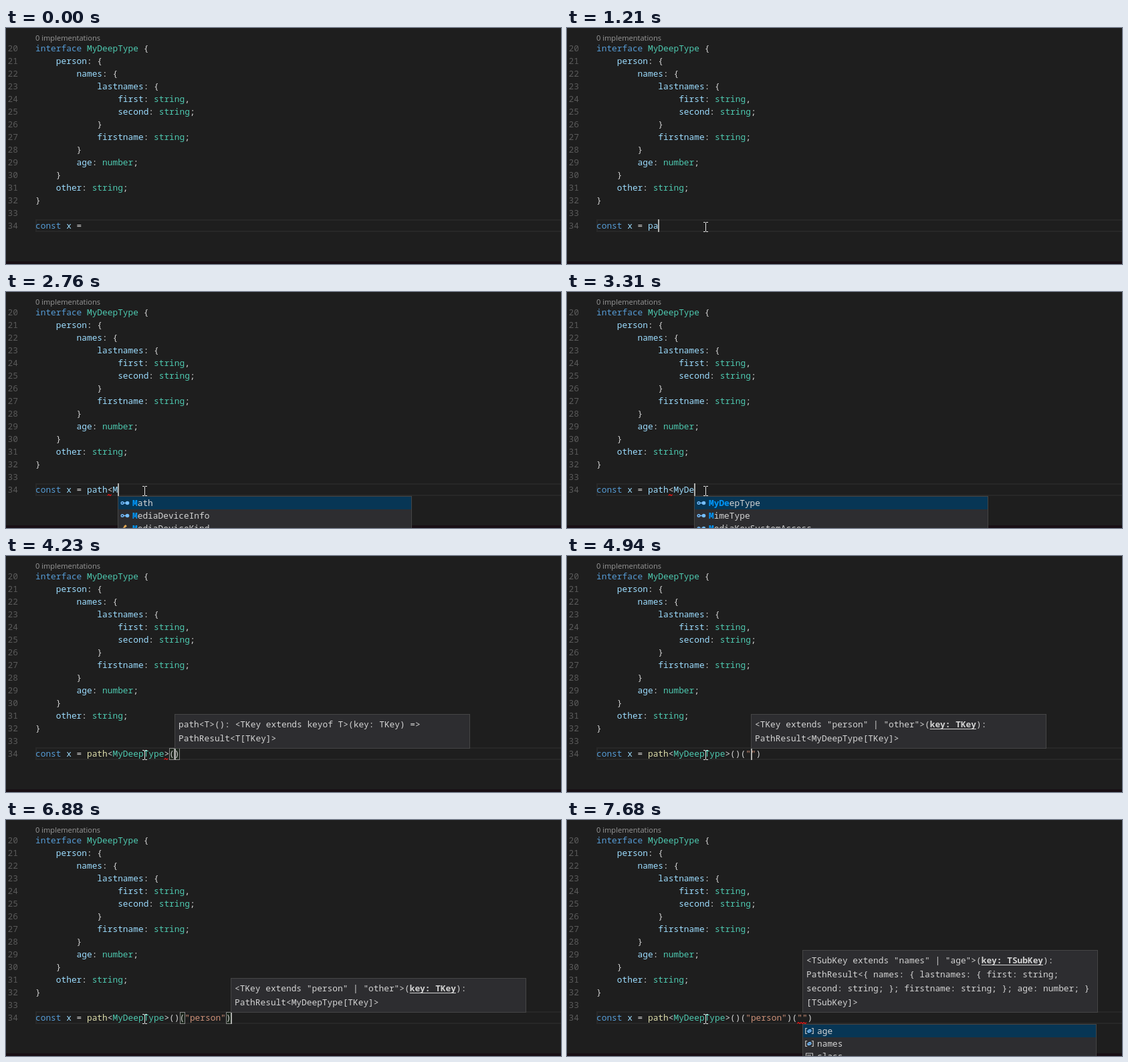
Recreate the animation shown at these times as an HTML page with a canvas. Size 830 by 354 pixels, loop 8 s.

```html
<!DOCTYPE html>
<html lang="en">
<head>
<meta charset="utf-8">
<title>Typed path editor</title>
<style>
  html, body { margin: 0; width: 100%; height: 100%; overflow: hidden; background: #1e1e1e; }
  canvas { display: block; }
</style>
</head>
<body>
<canvas id="stage" width="830" height="354"></canvas>
<script>
const ctx = document.getElementById('stage').getContext('2d');
const LOOP = 8000, CHAR = 7.697, LEFT = 44, ROW = 19, LINE_Y = 287;
const MONO = '12.83px "Noto Sans Mono", "DejaVu Sans Mono", monospace';
const C = {
  bg: '#1e1e1e', plain: '#d4d4d4', key: '#569cd6', type: '#4ec9b0', name: '#9cdcfe',
  call: '#dcdcaa', str: '#ce9178', num: '#5a5a5a', panel: '#2d2d30', edge: '#454545',
  pick: '#073655', match: '#0097fb', blue: '#75beff', red: '#f01414'
};

const code = `interface MyDeepType {
    person: {
        names: {
            lastnames: {
                first: string,
                second: string;
            }
            firstname: string;
        }
        age: number;
    }
    other: string;
}`.split('\n');

const sigs = {
  path: ['path<T>(): <TKey extends keyof T>(key: TKey) =>', 'PathResult<T[TKey]>'],
  top: ['<TKey extends "person" | "other">(*key: TKey*):', 'PathResult<MyDeepType[TKey]>'],
  sub: ['<TSubKey extends "names" | "age">(*key: TSubKey*):',
    'PathResult<{ names: { lastnames: { first: string;',
    'second: string; }; firstname: string; }; age: number; }', '[TSubKey]>']
};

// Each list row: icon kind and label
const lists = {
  pat: [['const', 'path'], ['iface', 'PathResult'], ['iface', 'PaymentAddress']],
  m: [['iface', 'Math'], ['iface', 'MediaDeviceInfo'], ['enum', 'MediaDeviceKind']],
  my: [['iface', 'MyDeepType'], ['iface', 'MimeType'], ['iface', 'MediaKeySystemAccess']],
  keys: [['const', 'other'], ['const', 'person'], ['word', 'class']],
  subs: [['const', 'age'], ['const', 'names'], ['word', 'class']]
};

const start = { text: '', at: 10, caret: false, wave: null, pair: null, sig: null, sigAt: 0,
  list: null, listAt: 0, pick: 0, hit: 0 };
const type = (text, at, more) => ({ text, at, caret: true, ...more });
const show = (list, listAt, hit = 0) => ({ list, listAt, hit, pick: 0 });
const help = (sig, sigAt) => ({ sig, sigAt });
const T = 'path<MyDeepType>', K = T + '()("person")';

const events = [
  [440, { caret: true }],
  [980, { caret: false }],
  [1130, type('p', 11)],
  [1210, type('pa', 12)],
  [1280, type('pat', 13)],
  [1360, show('pat', 13, 3)],
  [1510, type('path', 14, { list: null })],
  [1830, { wave: [10, 13] }],
  [2060, show('pat', 14, 4)],
  [2150, type('path<', 15, { list: null })],
  [2530, { wave: [14, 15] }],
  [2690, type('path<M', 16)],
  [2760, show('m', 16, 1)],
  [2840, type('path<My', 17, { list: null })],
  [2920, show('my', 17, 2)],
  [3070, type('path<MyD', 18, { list: null })],
  [3150, type('path<MyDe', 19)],
  [3310, show('my', 19, 4)],
  [3470, type('path<MyDeepType', 25, { list: null })],
  [3620, type(T, 26)],
  [4010, type(T + '()', 27, { pair: [26, 27], wave: null })],
  [4160, { ...help('path', 27), wave: [25, 26] }],
  [4400, type(T + '()', 28)],
  [4460, { sigAt: 28 }],
  [4720, type(T + '()()', 29, { pair: [28, 29], wave: null })],
  [4790, help('top', 29)],
  [4870, type(T + '()("")', 30, { pair: null })],
  [4940, { sigAt: 30 }],
  [5100, { wave: [29, 31] }],
  [5180, show('keys', 30)],
  [5320, { caret: false }],
  [5550, { pick: 1 }],
  [5790, { caret: true }],
  [6100, type(K, 36, { list: null, sigAt: 36, wave: [29, 37] })],
  [6330, { wave: null }],
  [6560, { at: 37 }],
  [6640, { sigAt: 37 }],
  [6800, { at: 38, pair: [28, 37] }],
  [6880, { sigAt: 38 }],
  [7030, type(K + '()', 39, { pair: [38, 39] })],
  [7110, help('sub', 39)],
  [7190, type(K + '("")', 40, { pair: null })],
  [7270, { sigAt: 40 }],
  [7500, { wave: [39, 41] }],
  [7590, show('subs', 40)],
  [7680, { caret: false }]
];

const colX = col => LEFT + col * CHAR;

function box(x, y, w, h, fill) {
  ctx.fillStyle = fill;
  ctx.fillRect(x, y, w, h);
}

// Monospace text on the character grid; returns the x after it
function write(s, x, y, color, bold) {
  ctx.font = (bold ? 'bold ' : '') + MONO;
  ctx.fillStyle = color;
  for (const ch of s) {
    if (ch !== ' ') ctx.fillText(ch, x, y);
    x += CHAR;
  }
  return x;
}

function colorOf(word, called) {
  if (/^(interface|const)$/.test(word)) return C.key;
  if (/^(string|number)$/.test(word)) return C.type;
  if (word[0] === '"') return C.str;
  if (word === 'path') return called ? C.call : C.name;
  if (word === 'MyDeepType') return called ? C.type : C.name;
  return /\w/.test(word) ? C.name : C.plain;
}

function codeLine(s, y, called) {
  let x = LEFT;
  for (const word of s.match(/"\w*"|\w+|\W/g) || []) x = write(word, x, y, colorOf(word, called));
}

function strokePath(points, color, width = 1) {
  ctx.strokeStyle = color;
  ctx.lineWidth = width;
  ctx.beginPath();
  points.forEach(([x, y]) => ctx.lineTo(x, y));
  ctx.stroke();
}

function squiggle([from, to]) {
  const points = [], end = colX(to);
  for (let x = colX(from), i = 0; x <= end; x += 2, i++) points.push([x, i % 2 ? 303.6 : 305.4]);
  strokePath(points, C.red, 1.1);
}

function frame(x, y, w, h, color) {
  ctx.strokeStyle = color;
  ctx.lineWidth = 1;
  ctx.strokeRect(x + .5, y + .5, w - 1, h - 1);
}

function drawSig({ sig, sigAt }) {
  const lines = sigs[sig], h = 10 + 21 * lines.length, x = Math.round(colX(sigAt)), y = 289 - h;
  box(x, y, 442, h, C.panel);
  frame(x, y, 442, h, C.edge);
  lines.forEach((line, i) => {
    let px = x + 6;
    const base = y + 20 + 21 * i;
    line.split('*').forEach((part, j) => {
      const from = px;
      px = write(part, px, base, C.plain, j === 1);
      if (j === 1) box(from, base + 2, px - from, 1, C.plain);
    });
  });
}

function drawIcon(kind, x, y) {
  ctx.lineWidth = 1.4;
  if (kind === 'iface') {
    ctx.strokeStyle = ctx.fillStyle = C.blue;
    ctx.beginPath();
    ctx.arc(x + 3, y, 1.8, 0, 7);
    ctx.moveTo(x + 5, y);
    ctx.lineTo(x + 9, y);
    ctx.stroke();
    ctx.beginPath();
    ctx.arc(x + 10.5, y, 2.8, 0, 7);
    ctx.fill();
  } else if (kind === 'const') {
    const side = (a, b) => strokePath([[b, y - 4], [a, y - 4], [a, y + 4], [b, y + 4]], '#c5c5c5', 1.2);
    side(x + .8, x + 3.2);
    side(x + 12.2, x + 9.8);
    ctx.fillStyle = C.blue;
    ctx.beginPath();
    ctx.ellipse(x + 6.5, y, 3.3, 2.4, -.5, 0, 7);
    ctx.fill();
    strokePath([[x + 4.8, y - .4], [x + 6.4, y + .4], [x + 8.5, y - .8]], C.panel, .8);
  } else if (kind === 'word') {
    frame(x + 1, y - 5, 11, 11, '#c5c5c5');
    box(x + 3, y - 2, 6, 1, '#c5c5c5');
  } else {
    ctx.save();
    ctx.translate(x + 6, y);
    ctx.rotate(-.7);
    box(-5, -2, 6, 5, '#d7a36a');
    box(1, -3, 4, 3, '#e8ab53');
    ctx.restore();
  }
}

function drawList({ list, listAt, pick, hit }) {
  const x = Math.round(colX(listAt));
  box(x, 306, 440, 60, C.panel);
  frame(x, 306, 440, 60, C.edge);
  lists[list].forEach(([kind, label], i) => {
    const y = 307 + i * ROW;
    if (i === pick) box(x + 1, y, 438, ROW, C.pick);
    drawIcon(kind, x + 4, y + 9.5);
    const n = i ? Math.min(hit, 1) : hit;
    const px = write(label.slice(0, n), x + 22, y + 14, C.match, true);
    write(label.slice(n), px, y + 14, C.plain);
  });
}

function drawMouse(t) {
  if (t < 70) return;
  const p = Math.min(6, Math.floor((t - 70) / 73)) / 6, left = (1 - p) ** 2;
  const x = Math.round(207 + 202 * left), y = Math.round(298 + 46 * left);
  box(x, y - 6, 1, 13, '#e4e4e4');
  for (const dy of [-7, 7]) {
    box(x - 3, y + dy, 3, 1, '#e4e4e4');
    box(x + 1, y + dy, 3, 1, '#e4e4e4');
  }
}

function draw(t) {
  const s = { ...start };
  for (const [time, change] of events) if (time <= t) Object.assign(s, change);

  box(0, 0, 830, 354, C.bg);
  ctx.font = '11.1px "Open Sans", "Noto Sans", sans-serif';
  ctx.fillStyle = '#999';
  ctx.fillText('0 implementations', LEFT, 19);

  box(LEFT, LINE_Y, 786, ROW, '#282828');
  box(LEFT + 2, LINE_Y + 2, 784, ROW - 4, C.bg);
  for (let i = 0; i < 15; i++) write(String(20 + i), 2.6, 35 + i * ROW, C.num);
  code.forEach((line, i) => codeLine(line, 35 + i * ROW, true));

  for (const col of s.pair || []) {
    const x = Math.round(colX(col));
    box(x, 288, 8, 18, 'rgba(0,100,0,.1)');
    frame(x, 288, 8, 18, '#888');
  }
  codeLine('const x = ' + s.text, 301, s.text.includes('('));
  if (s.wave) squiggle(s.wave);
  if (s.caret) box(Math.round(colX(s.at)), LINE_Y, 2, ROW, '#aeafad');

  box(0, 350, 830, 4, '#180f15');
  if (s.list) drawList(s);
  if (s.sig) drawSig(s);
  drawMouse(t);
}

const begin = performance.now();
function tick() {
  draw((performance.now() - begin) % LOOP);
  requestAnimationFrame(tick);
}
tick();
</script>
</body>
</html>
```
